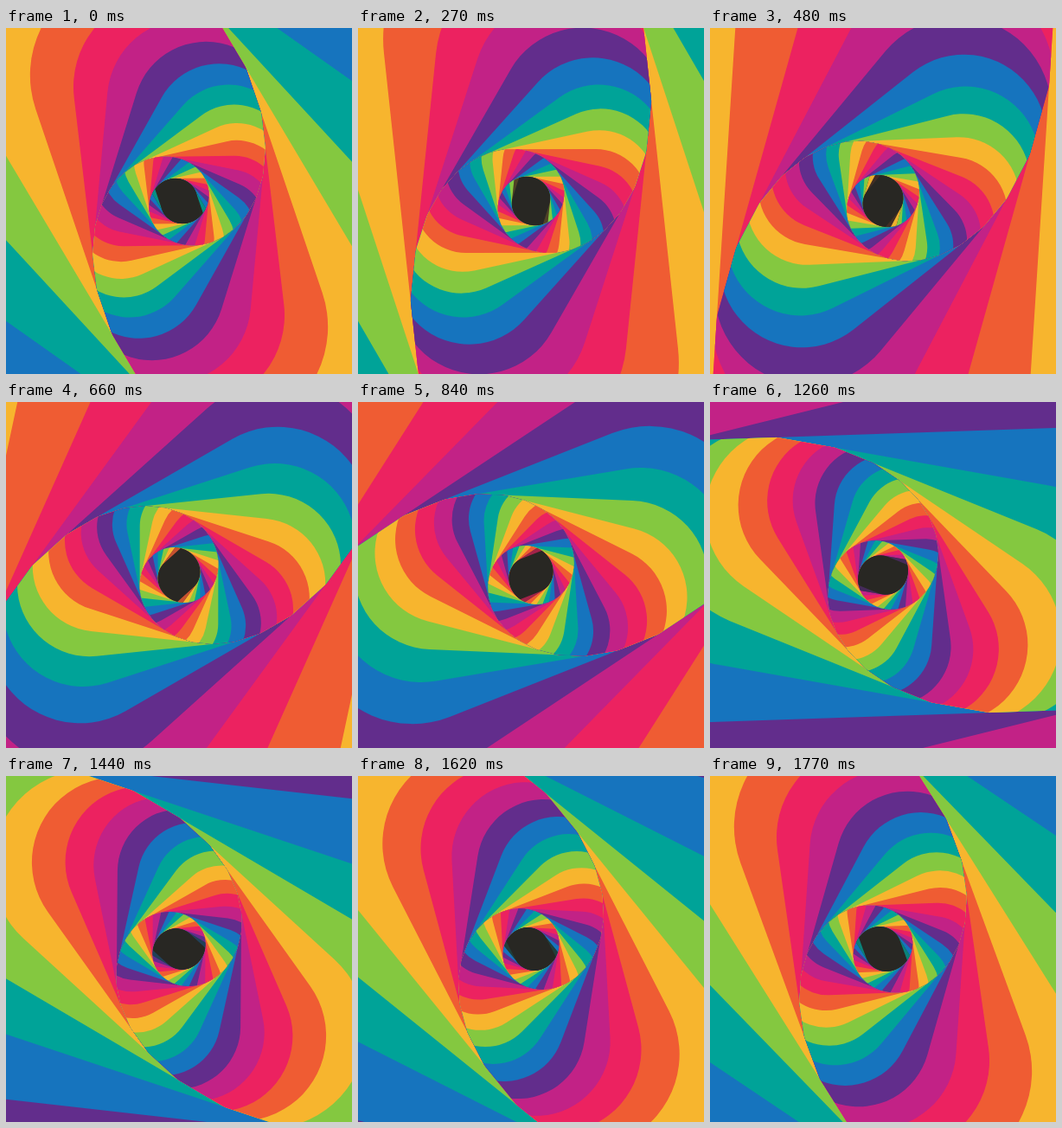
An HTML page with a canvas for the animation above (1.8 s loop, 400 by 400 pixels).

```html
<!DOCTYPE html>
<html lang="en">
<head>
<meta charset="utf-8">
<title>Rainbow tunnel</title>
<style>
  html, body { margin: 0; width: 100%; height: 100%; overflow: hidden; background: #282723; }
  canvas { display: block; }
</style>
</head>
<body>
<canvas id="stage" width="400" height="400"></canvas>
<script>
const ctx = document.getElementById('stage').getContext('2d');
const COLORS = ['#1674be', '#00a398', '#84c840', '#f7b52e', '#ef5c33', '#ec2260', '#c22286', '#622d8c'];
const LOOP = 1800, STEP = 30;
const RAD = Math.PI / 180;
const TWIST = 12 * RAD;                     // turn between neighbouring layers
const START_ANGLE = -186.5 * RAD;
const START_DEPTH = 10.48, FAR = 36.5;
const FOCAL = 796;

// Stadium centred on the origin
function stadium(radius, angle) {
  const reach = 1.25 * radius, q = Math.PI / 2;
  const dx = reach * Math.cos(angle), dy = reach * Math.sin(angle);
  ctx.beginPath();
  ctx.arc(dx, dy, radius, angle - q, angle + q);
  ctx.arc(-dx, -dy, radius, angle + q, angle + 3 * q);
  ctx.closePath();
}

function fill(color, alpha) {
  ctx.globalAlpha = alpha;
  ctx.fillStyle = color;
  ctx.fillRect(-200, -200, 400, 400);
}

function draw(progress) {
  const travel = 8 * progress;              // layers passed so far
  const spin = START_ANGLE + Math.PI * progress;
  ctx.save();
  ctx.translate(200, 200);
  for (let k = Math.ceil(1 + travel - START_DEPTH); ; k++) {
    const depth = START_DEPTH + k - travel;
    stadium(FOCAL / depth, spin + TWIST * depth);
    ctx.clip();                             // each layer stays inside all nearer ones
    const light = Math.min(1, (FAR - depth) / 1.2);
    if (light < 1) fill('#282723', 1);
    if (light <= 0) break;
    fill(COLORS[(k + 16) % 8], light);
  }
  ctx.restore();
}

const begin = performance.now();
function tick() {
  const time = (performance.now() - begin) % LOOP;
  draw(Math.floor(time / STEP) * STEP / LOOP);
  requestAnimationFrame(tick);
}
tick();
</script>
</body>
</html>
```
